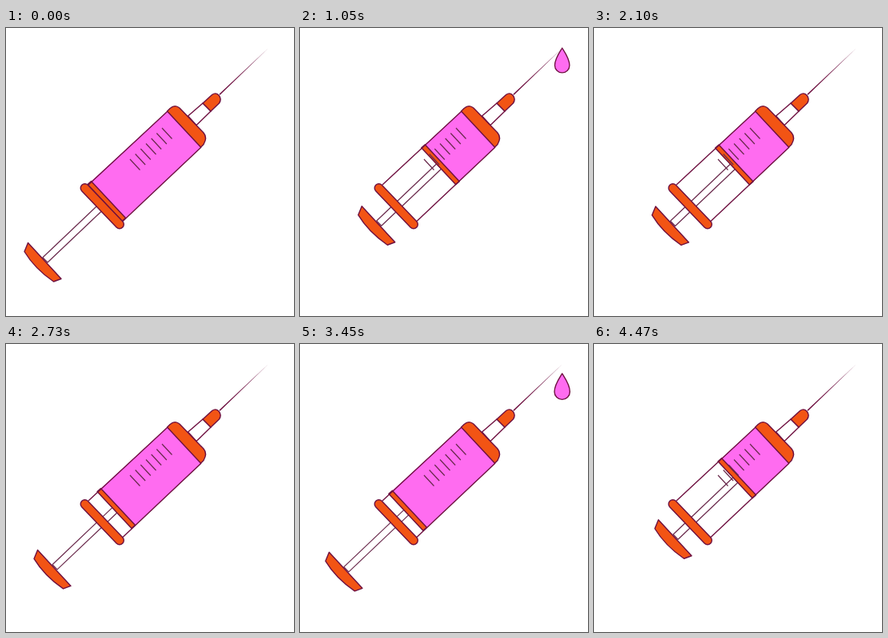
An HTML page that plays this animation: 360x360 px, repeating every 4500 ms.

```html
<!DOCTYPE html>
<html lang="en">
<head>
<meta charset="utf-8">
<title>Syringe</title>
<style>
  html, body { margin: 0; width: 100%; height: 100%; overflow: hidden; background: #fff; }
  svg { display: block; width: 100vw; height: 100vh; }
  .ink { stroke: #6e1040; stroke-width: 1.4; stroke-linejoin: round; }
  .thin { stroke: #6a2a4c; stroke-width: 1.2; }
  .orange { fill: #f25414; }
  .pink { fill: #ff6cf0; }
  .white { fill: #fff; }
</style>
</head>
<body>
<svg viewBox="0 0 360 360">
  <path class="white" d="M103 196 L202 104 L244 149 L146 241.5Z"/>
  <path id="liquid" class="pink"/>
  <g class="ink">
    <g class="plunger">
      <path class="white thin" d="M46 286.800 L121 215.500 L127 221.800 L52 293Z"/>
      <path class="orange" d="M102 195.500 L106.500 191.500 L149.500 237.500 L145 241.500Z"/>
    </g>
    <path fill="none" d="M103 196 L202 104 M146 241.500 L244 149"/>
    <path id="ticks" class="thin" fill="none"/>
    <path class="white" d="M227.500 110 L246 94 L256 104 L238 121.500Z"/>
    <path class="orange" d="M246 94 L257.500 83.500 Q262 80 266 84 Q270 89 266.500 94 L256 104Z"/>
    <path class="orange" d="M201.500 104 L205 100.500 Q211 95 217 100 L247 131 Q252 137 247 145.500 L243.500 149Z"/>
    <path class="orange" d="M94.700 203.700 A5.300 5.300 0 0 1 102.300 196.300 L145.800 241.800 A5.300 5.300 0 0 1 138.200 249.200Z"/>
    <path class="plunger orange" d="M27.500 268.500 L69 313.500 L59.500 317 Q36 301 23 279.500Z"/>
  </g>
  <path fill="#6e1040" d="M266.500 82.500 L327 26 L267.500 83.700Z"/>
  <g id="drops"></g>
</svg>
<script>
const CYCLE = 3115, PUSH = 1250, RETURN_START = 1900, TRAVEL = 53, SLOPE = 0.92;
const DROPS = 4, DROP_GAP = 260, GROW_START = 100, GROW = 180, FALL_START = 300, FALL = 220;
const $ = id => document.getElementById(id);
const clamp = v => Math.min(1, Math.max(0, v));
const ease = u => (1 - Math.cos(Math.PI * clamp(u))) / 2;

$('ticks').setAttribute('d', Array.from({ length: 7 }, (_, i) =>
  `M${195 - i * 6.67} ${125 + i * 6.5} l12.5 13.5`).join(''));
$('drops').innerHTML = ('<path class="pink ink" d="M0 0 C3 5 9.700 14 9.700 22.800 ' +
  'A9.700 9.700 0 0 1 -9.700 22.800 C-9.700 14 -3 5 0 0Z"/>').repeat(DROPS);
const drops = [...$('drops').children];
const plunger = document.querySelectorAll('.plunger');

function drawDrop(drop, age) {
  const growth = clamp((age - GROW_START) / GROW);
  const fallTime = Math.max(0, age - FALL_START);
  const shrink = 1 - (fallTime / FALL) ** 3;
  const visible = growth > 0 && shrink > 0;
  drop.setAttribute('display', visible ? 'inline' : 'none');
  if (!visible) return;
  const y = 25 + 0.33 * fallTime + 22 * (1 - shrink);
  drop.setAttribute('transform', `translate(327.7 ${y}) scale(${growth * shrink})`);
}

function draw(now) {
  const t = now % 4500 % CYCLE;
  const x = TRAVEL * (ease(t / PUSH) - ease((t - RETURN_START) / (CYCLE - RETURN_START)));
  const y = -SLOPE * x;
  plunger.forEach(p => p.setAttribute('transform', `translate(${x} ${y})`));
  $('liquid').setAttribute('d',
    `M${106.5 + x} ${191.5 + y} L202 104 L244 149 L${149.5 + x} ${237.5 + y}Z`);
  drops.forEach((drop, i) => drawDrop(drop, t - i * DROP_GAP));
}

const start = performance.now();
function frame() {
  draw(performance.now() - start);
  requestAnimationFrame(frame);
}
frame();
</script>
</body>
</html>
```
